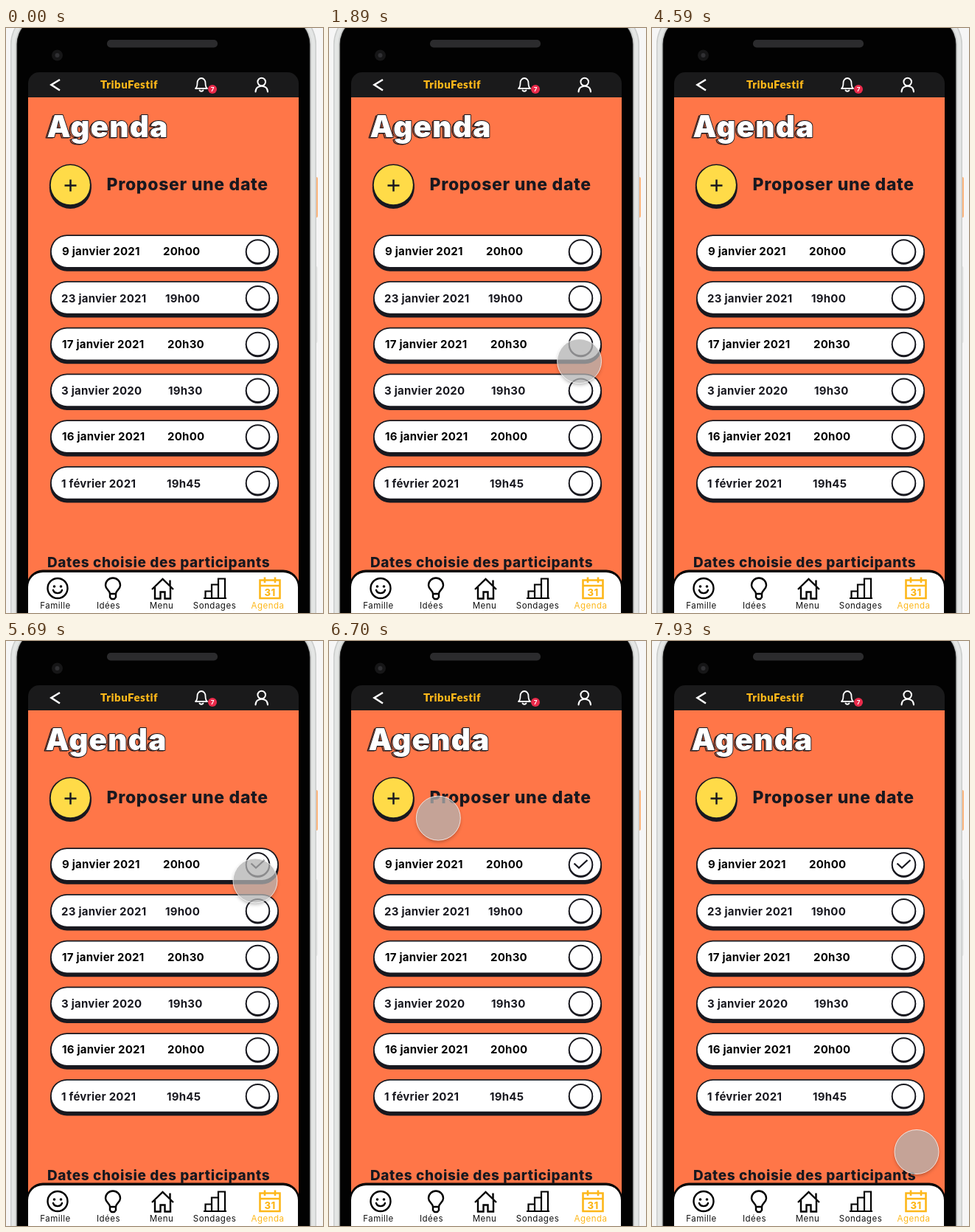
Write an HTML page with a canvas that moves like this. It is 430x793 px and loops after 8000 ms.

```html
<!DOCTYPE html>
<html lang="fr">
<head>
<meta charset="utf-8">
<title>Agenda</title>
<style>
html, body { margin: 0; width: 100%; height: 100%; overflow: hidden; background: #f6f6f6; }
canvas { display: block; width: 430px; height: 793px; }
</style>
</head>
<body>
<canvas id="stage" width="430" height="793"></canvas>
<script>
const ctx = document.getElementById('stage').getContext('2d');
const LOOP = 8000, INK = '#18181f', ORANGE = '#ff7648', GOLD = '#fdb71a';
const ROW_TOP = 280.2, ROW_GAP = 62.75;

// date, hour, hour x
const rows = [
  ['9 janvier 2021', '20h00', 213],
  ['23 janvier 2021', '19h00', 216],
  ['17 janvier 2021', '20h30', 219],
  ['3 janvier 2020', '19h30', 220],
  ['16 janvier 2021', '20h00', 219],
  ['1 février 2021', '19h45', 218]
];

// places where the pointer rests
const entry = [371, 737], wait = [375, 710], start = [360.5, 703];
const press = [340.5, 312.5], lift = [340.5, 300];
const back = [338, 325], below = [336.5, 396.5], add = [85.5, 212], exit = [359, 692.5];

// pointer moves: start, end, steps, path
const moves = [
  [500, 580, 2, [entry, entry, wait]],
  [810, 1350, 8, [wait, [397, 716], [328, 692], [368, 723], start]],
  [1580, 2350, 11, [start, [345, 520], [333, 350], press]],
  [3660, 3740, 2, [press, lift]],
  [5690, 5850, 3, [back, back, [333, 365], below]],
  [6150, 6930, 11, [below, [336, 386], [255, 315], [140, 235], add]],
  [7160, 7930, 11, [add, [158, 304], [243, 420], [310, 540], [348, 640], exit]]
];

// smooth curve through evenly timed points
function along(pts, u) {
  const n = pts.length - 1, i = Math.min(n - 1, Math.floor(u * n)), f = u * n - i;
  const at = k => pts[Math.max(0, Math.min(n, k))];
  const [a, b, c, d] = [at(i - 1), at(i), at(i + 1), at(i + 2)];
  return [0, 1].map(k => b[k] + 0.5 * f * (c[k] - a[k] +
    f * (2 * a[k] - 5 * b[k] + 4 * c[k] - d[k] + f * (3 * (b[k] - c[k]) + d[k] - a[k]))));
}

function pointerAt(t) {
  if (t < 500 || (t >= 4590 && t < 5690)) return null;
  const [from, to, n, pts] = moves.filter(m => t >= m[0]).pop();
  const step = Math.floor((t - from + 8) / ((to - from) / (n - 1)));
  return along(pts, Math.min(1, (step + 1) / n));
}

function box(x, y, w, h, r, fill) {
  ctx.beginPath();
  ctx.roundRect(x, y, w, h, r);
  ctx.fillStyle = fill;
  ctx.fill();
}

function disc(x, y, r, fill) {
  ctx.beginPath();
  ctx.arc(x, y, r, 0, 7);
  ctx.fillStyle = fill;
  ctx.fill();
}

function line(d, color, width, cap = 'round') {
  ctx.strokeStyle = color;
  ctx.lineWidth = width;
  ctx.lineCap = cap;
  ctx.lineJoin = cap === 'round' ? 'round' : 'miter';
  ctx.stroke(new Path2D(d));
}

function font(size, weight, gap, family = 'Inter') {
  ctx.font = `${weight} ${size}px ${family}, sans-serif`;
  ctx.letterSpacing = gap + 'px';
}

function text(s, x, y, color, align = 'left') {
  ctx.textAlign = align;
  ctx.fillStyle = color;
  ctx.fillText(s, x, y);
}

function shell(inset, fill) {
  box(inset, inset - 30, 427 - 2 * inset, 900, 52 - inset, fill);
}

function drawPhone() {
  ctx.fillStyle = '#f6f6f6';
  ctx.fillRect(0, 0, 430, 793);
  box(417, 202, 6, 55, 2, '#fbb47c');
  box(417, 323, 5.5, 104, 2, '#e3e3e3');
  shell(6, '#cbcdcc');
  shell(7.5, '#e4e6e5');
  shell(12.5, '#cfd1d0');
  shell(14.5, '#222');
  shell(15.5, '#020202');
  box(137, 16, 150, 10.5, 5, '#2b2b2d');
  disc(69.5, 37, 7.5, '#161617');
  disc(69.5, 37, 3, '#303033');
}

function drawHeader() {
  box(30, 60, 367, 60, [15, 15, 0, 0], '#1a1a1b');
  ctx.fillStyle = ORANGE;
  ctx.fillRect(30, 94, 367, 699);
  line('M73 70L61.5 77L73 84.5', '#fff', 2.6, 'butt');
  font(15, 900, 0.5, 'Lato');
  text('TribuFestif', 167, 82, GOLD, 'center');
  line('M257 82H273Q270.5 80 270.5 74.5A5.5 6.5 0 0 0 259.5 74.5Q259.5 80 257 82ZM262.5 84.5Q265 87 267.5 84.5', '#fff', 1.8);
  disc(280, 83, 6, '#ea2b4b');
  font(8, 700, 0);
  text('7', 280, 86, '#fff', 'center');
  line('M352 73A5.3 5.3 0 1 1 341.4 73A5.3 5.3 0 1 1 352 73M338.5 86.5C338.5 76 355 76 355 86.5', '#fff', 2);
}

function drawTitle(x) {
  font(40.5, 900, 1.2);
  ctx.lineJoin = 'round';
  ctx.textAlign = 'left';
  ctx.strokeStyle = INK;
  ctx.lineWidth = 1.2;
  ctx.strokeText('Agenda', x - 2.2, 149);
  ctx.lineWidth = 1.8;
  ctx.strokeText('Agenda', x, 148);
  text('Agenda', x, 148, '#fff');
}

function drawAdd() {
  disc(87.3, 216.5, 28.5, INK);
  disc(87.3, 213, 28.5, INK);
  disc(87.3, 212.7, 26.6, '#ffdb48');
  line('M79.5 213.5H95.5M87.5 205.5V221.5', INK, 2.5, 'butt');
  font(23, 800, 0.7);
  text('Proposer une date', 136.5, 219.5, INK);
}

function drawRow([date, hour, hourX], i) {
  const top = ROW_TOP + i * ROW_GAP, cy = top + 22.8, odd = i % 2;
  box(60, top + 4, 310, 45.5, 22.7, INK);
  box(60, top, 310, 45.5, 22.7, INK);
  box(61.8, top + 1.8, 306.4, 41.9, 20.9, '#fff');
  disc(341.5, cy + 1, 16.7, INK);
  disc(341.5, cy, 16.7, INK);
  disc(341.5, cy, 14.8, '#fff');
  font(15, 700, 0.25);
  const color = odd ? INK : '#000';
  text(date, 76 - odd, top + 27.8 + odd, color);
  text(hour, hourX, top + 27.8 + odd, color);
}

function drawNav() {
  font(19, 800, 0.6);
  text('Dates choisie des participants', 56, 731, INK);
  box(28, 734.5, 370, 90, 22, '#050505');
  box(30, 738, 366, 90, 20, '#fff');

  line('M83.5 759.5A13.5 13.5 0 1 1 56.5 759.5A13.5 13.5 0 1 1 83.5 759.5M64 762C66 767.5 74 767.5 76 762', '#000', 2.4);
  disc(65.5, 757, 1.8, '#000');
  disc(74.5, 757, 1.8, '#000');
  line('M141 767C141 762 135 761 135 755.5A10 10 0 0 1 155 755.5C155 761 149 762 149 767ZM141 767V771.5L143 774H147L149 771.5V767', '#000', 2.4);
  line('M198 761L212.5 747L227 761M202 758V773.5H209.5V764.5H215.5V773.5H223V758M222.5 756V748.5', '#000', 2.4, 'butt');
  line('M268 773H299M270.5 773V763.5H279M279 773V754.5H288M288 773V746.5H297V773', '#000', 2.2, 'butt');
  line('M344.5 748.5H371.5V773H344.5ZM344.5 756H371.5M351 744.5V752M365 744.5V752', GOLD, 2.6, 'butt');
  font(13, 800, 0.3);
  text('31', 358, 770, GOLD, 'center');

  font(11.5, 400, 0.5);
  ['Famille', 'Idées', 'Menu', 'Sondages', 'Agenda'].forEach((s, i) =>
    text(s, 67 + 72 * i, 787.3, i === 4 ? GOLD : '#111', 'center'));
}

function drawPointer([x, y]) {
  // shadow stays outside the translucent disc
  ctx.save();
  ctx.beginPath();
  ctx.rect(0, 0, 430, 793);
  ctx.arc(x, y, 30, 0, Math.PI * 2);
  ctx.clip('evenodd');
  ctx.shadowColor = 'rgba(0,0,0,.3)';
  ctx.shadowBlur = 5;
  ctx.shadowOffsetY = 2.5;
  disc(x, y, 29.5, '#b2b2b2');
  ctx.restore();
  disc(x, y, 30, 'rgba(178,178,178,.75)');
  ctx.beginPath();
  ctx.arc(x, y, 30, 0, 7);
  ctx.lineWidth = 1;
  ctx.strokeStyle = 'rgba(255,255,255,.75)';
  ctx.stroke();
}

function render(t) {
  const checked = t >= 4840;
  drawPhone();
  drawHeader();
  drawTitle(checked ? 53.5 : 55.5);
  drawAdd();
  rows.forEach(drawRow);
  if (checked) line('M332.5 301.5L339 307.5L350.5 297', INK, 2.3, 'butt');
  drawNav();
  const p = pointerAt(t);
  if (p) drawPointer(p);
}

const began = performance.now();
function tick() {
  render((performance.now() - began) % LOOP);
  requestAnimationFrame(tick);
}
tick();
</script>
</body>
</html>
```
